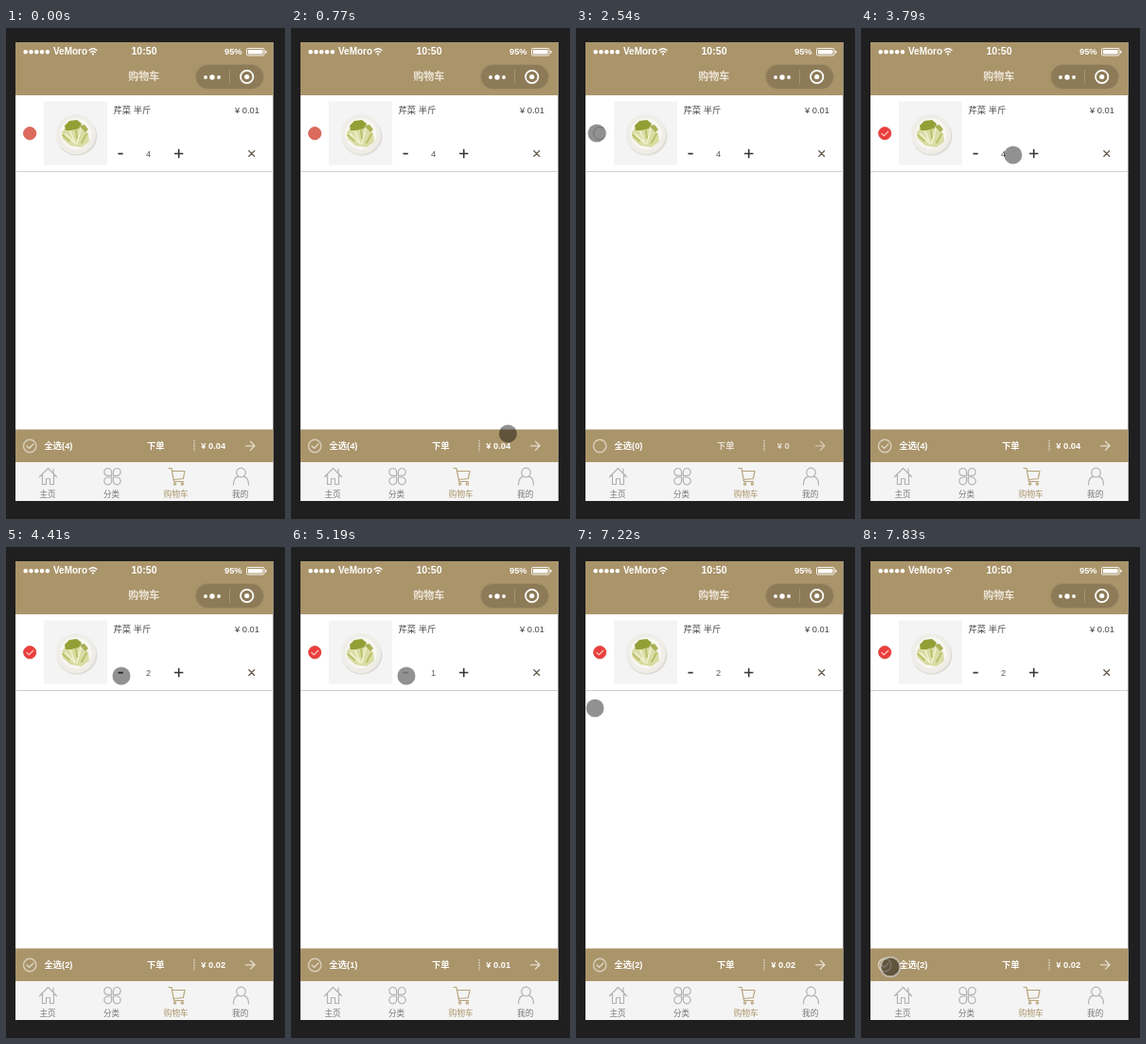
These frames come from a looping animation (295 by 518 pixels, 8 s). An HTML page:

```html
<!DOCTYPE html>
<html lang="zh">
<head>
<meta charset="utf-8">
<title>购物车</title>
<style>
html, body { margin: 0; height: 100%; overflow: hidden; background: #1f1f1f; }
svg { display: block; width: 100vw; height: 100vh; }
text { font-family: "Liberation Sans", "Noto Sans CJK SC", "Noto Sans CJK", sans-serif; font-size: 9.3px; }
.line { fill: none; stroke-linecap: round; stroke-linejoin: round; }
.mid { text-anchor: middle; }
.bar { fill: #aa946a; }
.status { fill: #fff; font-weight: bold; }
.foot text { fill: #fff; font-weight: bold; }
.tabs { stroke: #b3b3b3; stroke-width: 1.2; }
.labels text { font-size: 8.6px; fill: #777; }
.labels .on { fill: #aa946a; }
</style>
</head>
<body>
<svg viewBox="0 0 295 518">
  <rect x="10" y="15" width="272.5" height="484" fill="#fff"/>
  <rect class="bar" x="10" y="15" width="272.5" height="56"/>

  <!-- status bar -->
  <g class="status">
    <path class="line" d="M20.7 25.2h24" stroke="#fff" stroke-width="4.6" stroke-dasharray="0 5.8"/>
    <text x="50" y="28.2" textLength="" style="font-size:10px">VeMoro</text>
    <g class="line" stroke="#fff" stroke-width="1.3">
      <path d="M88 23.6q4-3.6 8 0M89.7 25.6q2.3-2 4.6 0"/>
    </g>
    <circle cx="92" cy="27.6" r="1.1"/>
    <text class="mid" x="146" y="28.4" style="font-size:10.6px">10:50</text>
    <text x="231" y="28">95%</text>
    <rect x="254.5" y="21.5" width="18.5" height="7.5" rx="1.2" fill="none" stroke="#fff" stroke-width=".9"/>
    <rect x="256" y="23" width="15.5" height="4.5"/>
    <rect x="274" y="24" width="1.4" height="2.6"/>
  </g>

  <!-- title and capsule -->
  <text class="mid" x="145.8" y="55" fill="#ece5d8" style="font-size:11px;font-weight:bold">购物车</text>
  <rect x="200.5" y="38.5" width="72" height="26" rx="13" fill="#8d7b58" stroke="#a08c67"/>
  <path d="M236.5 44v15" stroke="#a5936f"/>
  <g fill="#fff">
    <circle cx="211" cy="52" r="1.9"/><circle cx="218" cy="52" r="2.7"/><circle cx="225" cy="52" r="1.9"/>
    <circle cx="254.7" cy="51.5" r="2.6"/>
  </g>
  <circle cx="254.7" cy="51.5" r="6.7" fill="none" stroke="#fff" stroke-width="1.8"/>

  <!-- cart row -->
  <path d="M10 151.5h272.5" stroke="#cfcfcf"/>
  <circle id="dot" cx="25.2" cy="111.2" r="6.6"/>
  <path id="tick" class="line" d="M21.8 111.4l2.4 2.3 4.6-4.4" stroke="#f8c9bd" stroke-width="1.2"/>
  <rect x="40" y="77.5" width="67" height="67" fill="#f4f4f4"/>
  <ellipse cx="75" cy="114" rx="21.5" ry="20.5" fill="#dedcd6"/>
  <circle cx="74" cy="112" r="21" fill="#eeede7"/>
  <circle cx="74" cy="111.5" r="16.5" fill="#f8f7f2"/>
  <path d="M59 110l6-8 10 1 12 8 1 9-8 6-12-2-8-7z" fill="#d9dca4"/>
  <path d="M62 103l5-5 8-1 5 4-3 5-8 2-6 0z" fill="#929f35"/>
  <path d="M77 103l6-1 4 5-3 3z" fill="#a9b055"/>
  <g class="line" stroke-width="1.8">
    <path d="M63 112l9 9M68 109l5 13M79 107l-4 15" stroke="#f0efcb"/>
    <path d="M60 113l7 6M74 108l1 8M85 112l-5 9" stroke="#b9bf66"/>
  </g>
  <text x="113.5" y="90" fill="#444">芹菜 半斤</text>
  <text x="242" y="90" fill="#444">¥ 0.01</text>
  <path id="minus" d="M118.5 132.6h5.2" stroke-width="1.7"/>
  <path d="M178 132.5h9.4M182.7 127.8v9.4" stroke="#3a3632" stroke-width="1.6"/>
  <text id="qty" class="mid" x="150.7" y="135.8" fill="#5a5a62"></text>
  <path class="line" d="M256.7 129.5l6 6m0-6l-6 6" stroke="#5f5647" stroke-width="1.1"/>

  <!-- order bar -->
  <rect class="bar" x="10" y="423.5" width="272.5" height="34.5"/>
  <g class="foot">
    <circle cx="25.2" cy="441" r="6.7" fill="none" stroke="#d8cfbb" stroke-width="1.4"/>
    <path id="allTick" class="line" d="M22 441l2.5 2.5 4.4-4.6" stroke="#ded6c4" stroke-width="1.4"/>
    <text id="all" x="40.5" y="444.3"></text>
    <path d="M199 435v12" stroke="#e5dece" stroke-width="1.3" stroke-dasharray="1.6 1.2"/>
    <g id="order">
      <text class="mid" x="158.3" y="444.3">下单</text>
      <text id="sum" class="mid" x="219.2" y="444.3"></text>
      <path class="line" d="M253.5 440.8h9.3M258.5 436.3l4.5 4.5-4.5 4.5" stroke="#e4dccb" stroke-width="1.3"/>
    </g>
  </g>

  <!-- tab bar -->
  <rect x="10" y="458" width="272.5" height="41" fill="#f4f4f4"/>
  <g class="tabs line">
    <path d="M35.5 473.5l9-9 9 9M38.5 471.5v10h4v-6h4v6h4v-10M50 469v-4"/>
    <path d="M111.6 472.3h-3.8a3.9 3.9 0 1 1 3.8-3.9zM113.4 472.3h3.8a3.9 3.9 0 1 0-3.8-3.9zM111.6 474h-3.8a3.9 3.9 0 1 0 3.8 3.9zM113.4 474h3.8a3.9 3.9 0 1 1-3.8 3.9z"/>
    <path stroke="#b7a37a" d="M172 464.5h3l2.6 14h10M176 467.5h13l-1.6 8-10.3 1"/>
    <circle cx="178.6" cy="481" r="1.1" stroke="#b7a37a"/><circle cx="186.4" cy="481" r="1.1" stroke="#b7a37a"/>
    <circle cx="248.5" cy="469" r="4.8"/>
    <path d="M240.5 482q0-7.5 5-8.8M251.5 473.2q5 1.3 5 8.8"/>
  </g>
  <g class="labels">
    <text class="mid" x="44" y="495.2">主页</text>
    <text class="mid" x="111.5" y="495.2">分类</text>
    <text class="mid on" x="179.7" y="495.2">购物车</text>
    <text class="mid" x="247.7" y="495.2">我的</text>
  </g>

  <g id="touch">
    <circle r="9.5" fill="#000" fill-opacity=".43"/>
    <circle id="ring" r="10.4" fill="none" stroke="#c3c0b8" stroke-opacity=".8" stroke-width="1.6"/>
  </g>
</svg>
<script>
const $ = id => document.getElementById(id);

// touch path: time, x, y
const path = [
  [0, 259, 545], [80, 259, 529], [150, 258, 512], [450, 222, 335], [840, 231, 448],
  [1080, 231, 448], [1610, 174, 173], [1930, 19, 80], [2010, 19, 80], [2300, 22, 111],
  [3650, 22, 111], [3720, 95, 125], [3790, 161, 134], [3990, 122, 136],
  [5670, 122, 136], [5740, 150, 135], [5810, 176, 133], [6760, 176, 133],
  [7140, 19, 80], [7510, 24, 491], [7600, 31, 475], [7610, 31, 475], [7760, 31, 443]
];
const presses = [[2310, 2450], [3320, 3410], [4030, 4180], [4260, 4410],
  [4730, 4880], [5110, 5185], [6210, 6275], [7820, 8000]];
const counts = [[0, 4], [4180, 3], [4410, 2], [4960, 1], [6275, 2]];

function place(t) {
  const i = path.findIndex(k => k[0] > t);
  if (i < 0) return path[path.length - 1].slice(1);
  const a = path[i - 1], b = path[i], p = (t - a[0]) / (b[0] - a[0]);
  return [a[1] + (b[1] - a[1]) * p, a[2] + (b[2] - a[2]) * p];
}

const show = (id, on) => $(id).setAttribute("visibility", on ? "visible" : "hidden");

function draw(t) {
  const qty = counts.filter(c => c[0] <= t).pop()[1];
  const checked = t < 2450 || t >= 3450;
  const total = checked ? qty : 0;
  $("qty").textContent = qty;
  $("all").textContent = `全选(${total})`;
  $("sum").textContent = total ? `¥ ${(total / 100).toFixed(2)}` : "¥ 0";
  $("order").setAttribute("opacity", checked ? 1 : .72);
  $("minus").setAttribute("stroke", qty > 1 ? "#3a3632" : "#c4c4c4");
  $("dot").setAttribute("fill", !checked ? "#fff" : t < 2450 ? "#dc6a5d" : "#eb3d3d");
  $("dot").setAttribute("stroke", !checked ? "#c4c4c4" : t < 2450 ? "#d8675b" : "#e0504b");
  show("tick", t >= 3450);
  show("allTick", checked);
  $("touch").setAttribute("transform", `translate(${place(t)})`);
  show("ring", presses.some(([a, b]) => t >= a && t < b));
}

function tick() {
  draw(performance.now() % 8000);
  requestAnimationFrame(tick);
}
tick();
</script>
</body>
</html>
```
